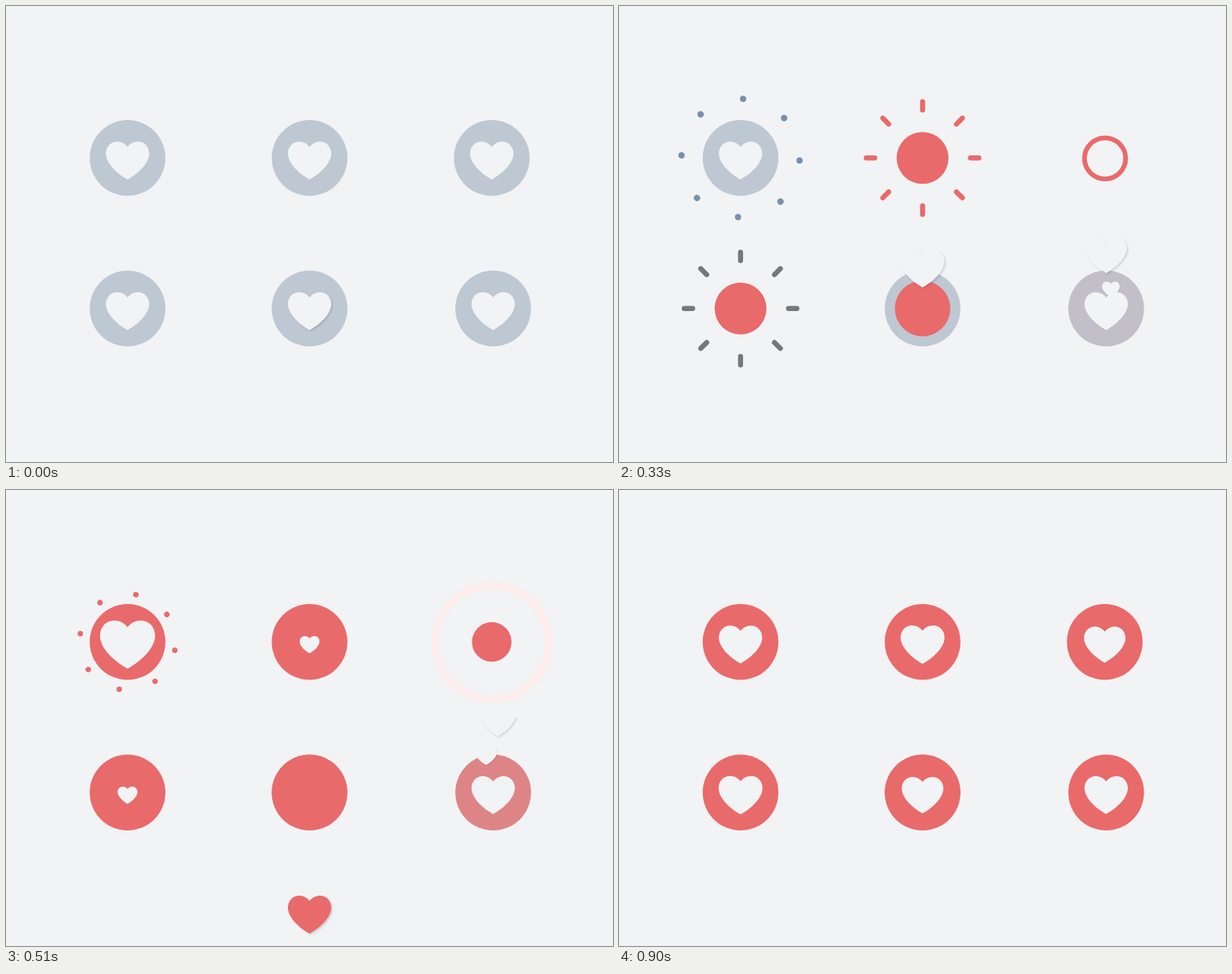
An HTML page for the animation above (1170 ms loop, 773 by 580 pixels).

```html
<!DOCTYPE html>
<html lang="en">
<head>
<meta charset="utf-8">
<title>Like buttons</title>
<style>
  html, body { margin: 0; width: 100%; height: 100%; overflow: hidden; background: #f1f3f5; }
  svg { display: block; width: 100%; height: 100%; }
</style>
</head>
<body>
<svg id="stage" viewBox="0 0 773 580">
  <defs>
    <filter id="shadow" x="-30%" y="-30%" width="160%" height="160%">
      <feDropShadow dx="1.6" dy="1.6" stdDeviation="1.1" flood-color="#3c4b5f" flood-opacity=".22"/>
    </filter>
    <clipPath id="ceiling"><rect y="289" width="773" height="291"/></clipPath>
  </defs>
</svg>
<script>
const LOOP = 1170, STEP = 30, REST = 900;
const R = 48.2, SINK = 3.4; // button radius, heart centre below button centre
const BG = [241, 243, 245], GREY = [190, 200, 210], RED = [233, 106, 106];
const BLUE = [120, 144, 171], BLUSH = [253, 237, 237], SLATE = [119, 119, 119];
const HEART = 'M0-17.4C3-21.4 8-24.1 13.5-24.1C21.5-24.1 27.6-17.4 27.6-8.9C27.6 2.6 15 15.6 0 24.1' +
  'C-15 15.6-27.6 2.6-27.6-8.9C-27.6-17.4-21.5-24.1-13.5-24.1C-8-24.1-3-21.4 0-17.4Z';
const stage = document.getElementById('stage');

// Progress and easing
const clamp = v => Math.min(1, Math.max(0, v));
const ramp = (t, from, to) => clamp((t - from) / (to - from));
const easeOut = p => 1 - (1 - p) ** 2;
const smooth = p => p * p * (3 - 2 * p);
const bump = (t, from, to) => Math.sin(Math.PI * ramp(t, from, to));
const spring = age => age <= 0 ? 0 : 1 - Math.exp(-.0095 * age) * Math.cos(.0203 * age);

const rgb = c => `rgb(${c.map(Math.round)})`;
const mix = (a, b, p) => rgb(a.map((v, i) => v + (b[i] - v) * p));

function set(node, attrs) {
  for (const name in attrs) node.setAttribute(name, attrs[name]);
  return node;
}
function add(parent, tag, attrs = {}) {
  return parent.appendChild(set(document.createElementNS('http://www.w3.org/2000/svg', tag), attrs));
}
const group = (x, y) => add(stage, 'g', { transform: `translate(${x} ${y})` });
const disc = (g, color = GREY) => add(g, 'circle', { r: R, fill: rgb(color) });
const heart = (g, attrs) => add(g, 'path', { d: HEART, fill: rgb(BG), ...attrs });
const place = (node, x, y, scale, turn = 0) =>
  set(node, { transform: `translate(${x} ${y}) rotate(${turn}) scale(${scale})` });
const show = (node, on) => set(node, { visibility: on ? 'visible' : 'hidden' });
const eight = make => Array.from({ length: 8 }, (_, i) => make(i));

// Dots fly out and are pulled back in
function magnet(x, y) {
  const g = group(x, y);
  const dots = eight(() => add(g, 'circle'));
  const base = disc(g), mark = heart(g);
  return t => {
    const dist = 40 + 47 * easeOut(ramp(t, 270, 390)) - 35 * smooth(ramp(t, 390, 570));
    const turn = 5 + (t - 390) / 24;
    const look = { cy: -dist, r: 4 - 2 * ramp(t, 480, 600), fill: mix(BLUE, RED, ramp(t, 400, 490)) };
    dots.forEach((dot, i) => {
      set(dot, { ...look, transform: `rotate(${turn + 45 * i})` });
      show(dot, t > 270 && t < 600);
    });
    set(base, { fill: mix(GREY, RED, ramp(t, 420, 500)) });
    place(mark, 0, SINK, 1 + .33 * bump(t, 400, 760));
  };
}

// Vanishes, then bursts back with rays
function burst(x, y, rayColor) {
  const g = group(x, y);
  const rays = eight(i => add(g, 'line', {
    stroke: rgb(rayColor), 'stroke-linecap': 'round', transform: `rotate(${45 * i})`
  }));
  const base = disc(g), mark = heart(g);
  return t => {
    const left = 1 - ramp(t, 10, 130) ** 2;
    const gone = left === 0;
    set(base, {
      r: R * (gone ? easeOut(ramp(t, 222, 468)) : left),
      fill: rgb(gone ? RED : GREY)
    });
    const scale = gone ? spring(t - 475) : left;
    place(mark, 0, SINK * (gone ? 1 : left), scale);
    const ray = {
      y1: -88 * easeOut(ramp(t, 194, 499)),
      y2: -88 * easeOut(ramp(t, 142, 472)),
      'stroke-width': 6.4 * (1 - ramp(t, 400, 480))
    };
    for (const node of rays) show(set(node, ray), t > 194 && t < 480);
  };
}

// Shrinks to a point, sends out a ring, grows back
function ripple(x, y) {
  const g = group(x, y);
  const ring = add(g, 'circle', { cx: .4, cy: .5, fill: 'none' });
  const base = disc(g), mark = heart(g);
  return t => {
    const left = 1 - ramp(t, 35, 277) ** 2;
    const gone = left === 0;
    set(base, {
      r: gone ? R * ramp(t, 384, 625) + 2.6 * bump(t, 605, 780) : R * left,
      fill: rgb(gone ? RED : GREY)
    });
    place(mark, 0, SINK * (gone ? 1 : left), gone ? spring(t - 576) : left);
    set(mark, { opacity: gone ? ramp(t, 576, 711) : 1 });
    const fade = ramp(t, 390, 510);
    set(ring, {
      r: 72.7 * easeOut(ramp(t, 280, 530)),
      stroke: mix(RED, BLUSH, fade),
      'stroke-width': 6 + 4 * fade
    });
    show(ring, t > 280 && t < 540);
  };
}

// Heart hops up, then drops off the stage
function toss(x, y) {
  const g = group(x, y);
  disc(g);
  const fill = disc(g, RED), next = heart(g), mark = heart(g, { filter: 'url(#shadow)' });
  return t => {
    set(fill, { r: R * easeOut(ramp(t, 224, 443)) });
    const fall = Math.max(0, t - 307) / 120;
    const lift = 57 * smooth(ramp(t, 140, 307)) - 73 * fall * fall;
    place(mark, 0, SINK - lift, 1 + .05 * bump(t, 30, 270));
    set(mark, { fill: mix(BG, RED, ramp(t, 400, 480)) });
    show(mark, t < 570);
    place(next, 0, SINK, spring(t - 572));
  };
}

// Ever smaller hearts float up out of the button
function bubbles(x, y) {
  const base = disc(group(x, y));
  const clip = add(stage, 'g', { 'clip-path': 'url(#ceiling)' });
  const floats = Array.from({ length: 3 }, () => heart(clip, { filter: 'url(#shadow)' }));
  const mark = heart(group(x, y));
  return t => {
    set(base, { fill: mix(GREY, RED, ramp(t, 304, 590)) });
    place(mark, 0, SINK, 1, -10 * bump(t, 30, 270));
    floats.forEach((node, i) => {
      const age = t - 137 - 118 * i;
      const grow = easeOut(clamp(age / 250));
      place(node, x + 9 * Math.sin(2.4 * i), y + SINK - .37 * age, grow * .8 ** i);
      show(node, age > 0 && age < 400);
    });
  };
}

const [col1, col2, col3] = [154.8, 386.6, 618.6], [row1, row2] = [193.3, 384.8];
const buttons = [
  magnet(col1, row1), burst(col2, row1, RED), ripple(col3, row1),
  burst(col1, row2, SLATE), toss(col2, row2), bubbles(col3 + 1.8, row2)
];

function draw(time) {
  const t = Math.min(REST, Math.floor((time % LOOP) / STEP) * STEP);
  for (const update of buttons) update(t);
}

const begin = performance.now();
function tick() {
  draw(performance.now() - begin);
  requestAnimationFrame(tick);
}
tick();
</script>
</body>
</html>
```
